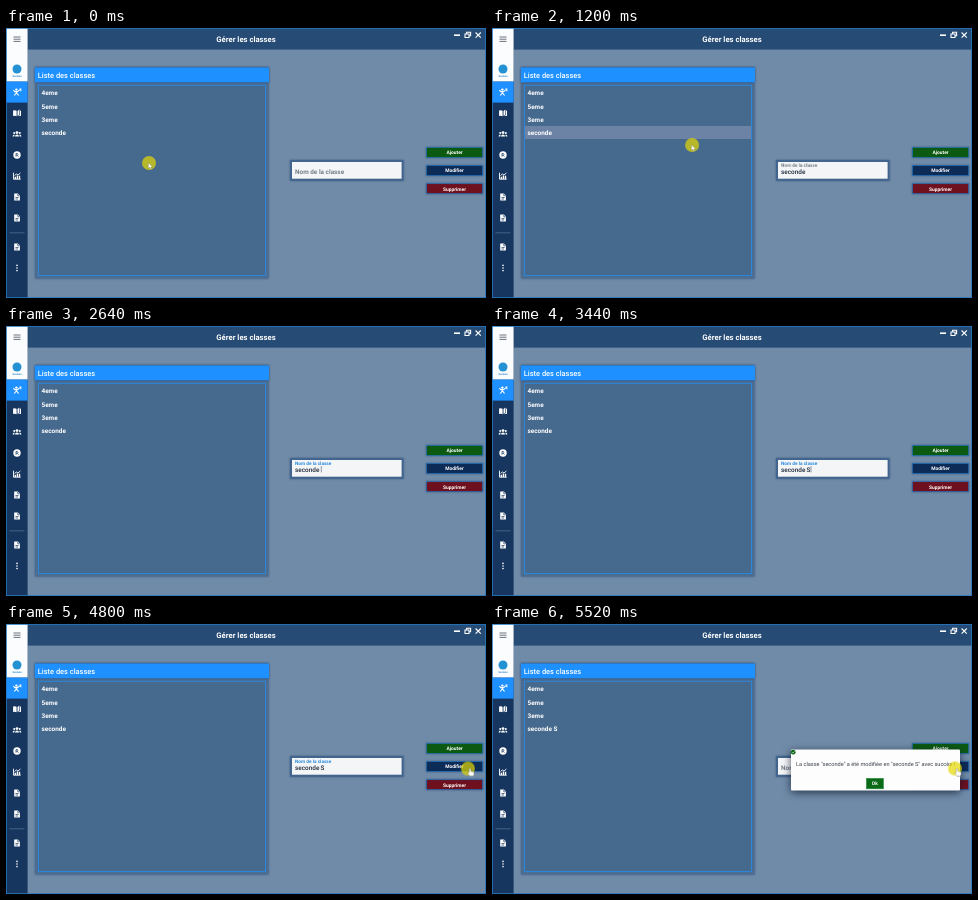
Recreate the animation shown at these times as an HTML page. Size 480 px wide and 270 px high, loop 5560 ms.

```html
<!DOCTYPE html>
<html lang="fr">
<head>
<meta charset="utf-8">
<title>Gérer les classes</title>
<style>
  html, body { margin: 0; width: 100%; height: 100%; overflow: hidden; background: #708ba8; }
  svg { display: block; width: 480px; height: 270px; }
  text { font-family: Roboto, Arial, sans-serif; font-weight: 700; fill: #fff; text-rendering: geometricPrecision; }
  .mid { text-anchor: middle; }
  .title { font-size: 7.7px; }
  .head { font-size: 7.45px; font-weight: 500; }
  .list, .label text { font-size: 6.4px; }
  .value text { font-size: 6.4px; font-weight: 500; fill: #1c2a3c; }
  .btn { font-size: 4.9px; }
  .msg { font-size: 5.6px; font-weight: 400; fill: #3c4148; }
  .brand { font-size: 2.5px; fill: #1e7fc4; }
  .shadow { filter: drop-shadow(0 .5px 1.2px rgba(20, 45, 85, .5)); }
  .icon { fill: #fff; }
  .line { fill: none; stroke: #fff; }

  /* One shared 5560 ms timeline: 1% = 55.6 ms */
  .anim { animation: 5560ms linear infinite; }
  .step { animation-timing-function: step-end; }

  .mouse { animation-name: mouse; }
  @keyframes mouse {
    0%, 1.4% { transform: translate(143px, 135px); animation-timing-function: ease-in-out; }
    10%, 16.5% { transform: translate(147px, 105px); animation-timing-function: ease-in-out; }
    29.5%, 69% { transform: translate(313px, 142.5px); animation-timing-function: ease-in; }
    74.1% { transform: translate(381px, 126.5px); animation-timing-function: ease-out; }
    84.2% { transform: translate(460.8px, 144.6px); }
    88.5%, 100% { transform: translate(463px, 144.5px); }
  }
  .pointer { animation-name: pointer; }
  @keyframes pointer {
    0%, 100% { visibility: visible; }
    42.8% { visibility: hidden; }
    69% { visibility: visible; }
  }
  .arrow { animation-name: arrow; }
  @keyframes arrow {
    0% { opacity: 1; } 27.5% { opacity: 0; }
    70.5% { opacity: 1; } 78.5%, 100% { opacity: 0; }
  }
  .beam { animation-name: beam; }
  @keyframes beam {
    0% { opacity: 0; } 27.5% { opacity: 1; } 70.5%, 100% { opacity: 0; }
  }
  .hand { animation-name: hand; }
  @keyframes hand {
    0% { opacity: 0; } 78.5%, 100% { opacity: 1; }
  }

  .row { animation-name: row; }
  @keyframes row {
    0%, 8.5% { opacity: 0; }
    9.5%, 13.7% { opacity: .75; }
    17%, 32.4% { opacity: 1; }
    35%, 100% { opacity: 0; }
  }
  .label { animation-name: float; }
  @keyframes float {
    0%, 11.5% { transform: translate(289px, 145.8px); animation-timing-function: ease-in-out; }
    15.83%, 93.5% { transform: translate(289px, 138.6px) scale(.74); animation-timing-function: ease-in-out; }
    97.1%, 100% { transform: translate(289px, 145.8px); }
  }
  .label text { animation-name: tint; }
  @keyframes tint {
    0%, 32.4% { fill: #75808c; }
    35%, 92.1% { fill: #2b8be0; }
    93.5%, 100% { fill: #75808c; }
  }
  .value { animation-name: value; }
  @keyframes value {
    0% { opacity: 0; } 11.5% { opacity: 1; } 93.5%, 100% { opacity: 0; }
  }
  .typed { animation-name: typed; }
  @keyframes typed {
    0% { opacity: 0; } 53.96%, 100% { opacity: 1; }
  }
  .caret { animation-name: caret; }
  @keyframes caret {
    0% { opacity: 0; transform: translateX(313.2px); }
    32.4% { opacity: 1; transform: translateX(313.2px); }
    41.9% { opacity: 0; transform: translateX(313.2px); }
    42.8% { opacity: 1; transform: translateX(314.8px); }
    52.3% { opacity: 0; transform: translateX(314.8px); }
    53.96% { opacity: 1; transform: translateX(318.5px); }
    63.5% { opacity: 0; transform: translateX(318.5px); }
    73% { opacity: 1; transform: translateX(318.5px); }
    82.6%, 100% { opacity: 0; transform: translateX(318.5px); }
  }
  .renamed { animation-name: renamed; }
  @keyframes renamed {
    0% { opacity: 0; } 93.5%, 100% { opacity: 1; }
  }
  .dialog { transform-origin: 383.5px 145.5px; animation-name: dialog; }
  @keyframes dialog {
    0%, 93.5% { opacity: 0; transform: scale(.3); animation-timing-function: ease-out; }
    97.1%, 100% { opacity: 1; transform: scale(1); }
  }
</style>
</head>
<body>
<svg viewBox="0 0 480 270">
  <defs>
    <g id="doc">
      <path class="icon" d="M-2.8-3.5H.9L2.9-1.4V3.5H-2.8z"/>
      <path d="M.8-3V-1.2H2.5M-1.5.5H1.5M-1.5 2H1" fill="none" stroke="#17365f" stroke-width=".7"/>
    </g>
  </defs>

  <!-- Window -->
  <rect width="480" height="270" fill="#708ba8"/>
  <rect width="480" height="21.6" fill="#264b75"/>
  <text class="title mid" x="240" y="14.1">Gérer les classes</text>
  <g class="line" stroke-width="1.1">
    <path d="M448 7.2H454" stroke-width="1.6"/>
    <path d="M459 6H463V9.5H459zM460.6 6V4.3H464.6V7.8H463"/>
    <path d="M469.6 4.5 474.8 9.7M474.8 4.5 469.6 9.7"/>
  </g>

  <!-- Sidebar -->
  <rect width="21.6" height="270" fill="#17365f"/>
  <rect width="21.6" height="53.6" fill="#fbfcfd"/>
  <path d="M7.5 9H14.5M7.5 11.2H14.5M7.5 13.4H14.5" stroke="#5b6470" stroke-width=".9"/>
  <circle cx="11" cy="41" r="4.5" fill="#2391d2"/>
  <text class="brand mid" x="11" y="48.6">Scolaire</text>
  <rect y="53.6" width="21.6" height="21" fill="#1e90ff"/>
  <g transform="translate(11 64)">
    <circle class="icon" cx="-.6" cy="-2.4" r="1.2"/>
    <path class="line" d="M-3.6-1.8-2.2-.4H.6L2.6-2.2M-.7-.3V1L-2.8 3.5M-.6.9 1.6 3.5M2.4-3H3.8V-.8" stroke-width="1.1"/>
  </g>
  <g transform="translate(11 85)">
    <path class="icon" d="M-3.9-2.6Q-1.9-3.2-.4-2.2V3.2Q-1.9 2.3-3.9 2.9zM.5-2.1 2.4-3.6V1.5L.5 3zM3-2.5 4-2.2V3Q2.4 2.5.8 3.3L3 1.8z"/>
  </g>
  <g class="icon" transform="translate(11 106)">
    <circle cy="-1.4" r="1.4"/><circle cx="-2.8" cy="-.9" r="1"/><circle cx="2.8" cy="-.9" r="1"/>
    <path d="M-2 2.6Q-2 .5 0 .5T2 2.6zM-4.4 2.6Q-4.4.6-2.5.6L-2.6 2.6zM4.4 2.6Q4.4.6 2.5.6L2.6 2.6z"/>
  </g>
  <g transform="translate(11 127)">
    <circle class="icon" r="3.7"/>
    <path d="M-1 1.7V-1.5H.4Q1.5-.7.4.2H-1M.2.2 1.4 1.7" fill="none" stroke="#17365f" stroke-width=".7"/>
  </g>
  <g class="line" transform="translate(11 148)">
    <path d="M-3.5-3.3V3.2H3.7" stroke-width=".9"/>
    <path d="M-1.7 3V.7M.4 3V-.4M2.5 3V-.2" stroke-width="1.4"/>
    <path d="M-2.5-.5-.7-2 1-1 3.4-3" stroke-width=".9"/>
  </g>
  <use href="#doc" x="11" y="169"/>
  <use href="#doc" x="11" y="190"/>
  <path d="M3.5 204.8H18.5" stroke="#4d6c92" stroke-width=".8"/>
  <use href="#doc" x="11" y="219"/>
  <g class="icon">
    <circle cx="11" cy="237.4" r=".8"/><circle cx="11" cy="240" r=".8"/><circle cx="11" cy="242.6" r=".8"/>
  </g>
  <rect x=".4" y=".4" width="479.2" height="269.2" fill="none" stroke="#2478c4" stroke-width=".8"/>

  <!-- Class list -->
  <rect class="shadow" x="29" y="39.5" width="233.5" height="211" fill="#4c6d92"/>
  <rect x="32.5" y="57.3" width="227" height="190.2" fill="#46698e" stroke="#2a88e0" stroke-width=".9"/>
  <rect class="shadow" x="28.8" y="39.5" width="234.2" height="14.8" fill="#1e90ff"/>
  <text class="head" x="31.8" y="49.7">Liste des classes</text>
  <rect class="row anim" x="33" y="98" width="226" height="13" fill="#6d83a5"/>
  <g class="list">
    <text x="35.5" y="67.3">4eme</text>
    <text x="35.5" y="80.5">5eme</text>
    <text x="35.5" y="93.6">3eme</text>
    <text x="35.5" y="106.8">seconde</text>
    <text class="renamed anim step" x="61.4" y="106.8">S</text>
  </g>

  <!-- Name field -->
  <rect class="shadow" x="284" y="132" width="113.5" height="20.8" fill="#41658f"/>
  <rect x="286" y="134" width="109.6" height="16.7" fill="#f4f5f6"/>
  <g class="label anim"><text class="anim">Nom de la classe</text></g>
  <g class="value anim step">
    <text x="289" y="145.5">seconde</text>
    <text class="typed anim step" x="314.5" y="145.5">S</text>
  </g>
  <rect class="caret anim step" y="140" width=".6" height="6.4" fill="#4a5a70"/>

  <!-- Actions -->
  <g class="shadow" stroke="#2273bd" stroke-width=".7">
    <rect x="420.4" y="119.4" width="56.3" height="10" fill="#0c5a12"/>
    <rect x="420.4" y="137.5" width="56.3" height="10" fill="#0d2b57"/>
    <rect x="420.4" y="155.7" width="56.3" height="10" fill="#6e101d"/>
  </g>
  <g class="btn mid">
    <text x="448.5" y="126.2">Ajouter</text>
    <text x="448.5" y="144.3">Modifier</text>
    <text x="448.5" y="162.5">Supprimer</text>
  </g>

  <!-- Confirmation -->
  <g class="dialog anim">
    <rect x="299" y="125.5" width="169" height="41" rx="1" fill="#fdfdfd"
          style="filter: drop-shadow(0 2px 4px rgba(10, 20, 40, .75))"/>
    <circle cx="301.2" cy="128.2" r="2.4" fill="#0b6a18"/>
    <path class="line" d="M300 128.2 300.9 129.1 302.5 127.4" stroke-width=".6"/>
    <text class="msg mid" x="383.5" y="142">La classe "seconde" a été modifiée en "seconde S" avec succès !</text>
    <rect x="374.4" y="154.4" width="17" height="10.4" fill="#0b6a18" stroke="#258a3c" stroke-width=".6"/>
    <text class="btn mid" x="382.8" y="161.4">Ok</text>
  </g>

  <!-- Mouse -->
  <g class="mouse anim">
    <g class="pointer anim step">
      <circle r="7" fill="#e6d800" fill-opacity=".7"/>
      <path class="arrow anim step" d="M-.6-.2V5.4L.7 4.3 1.6 6.4 2.5 6 1.6 4H3.4z" fill="#fff" stroke="#333" stroke-width=".2"/>
      <path class="beam anim step" d="M-1-3H1M0-3V3M-1 3H1" fill="none" stroke="#807a20" stroke-width=".6"/>
      <path class="hand anim step" d="M1.2.2Q2-.7 2.8.3V2.7L5.6 3.4Q6.5 3.8 6.2 4.9L5.5 7.5H2.1L-.3 4.8Q.1 3.6 1.2 4.3z" fill="#fff" stroke="#333" stroke-width=".25"/>
    </g>
  </g>
</svg>
</body>
</html>
```
